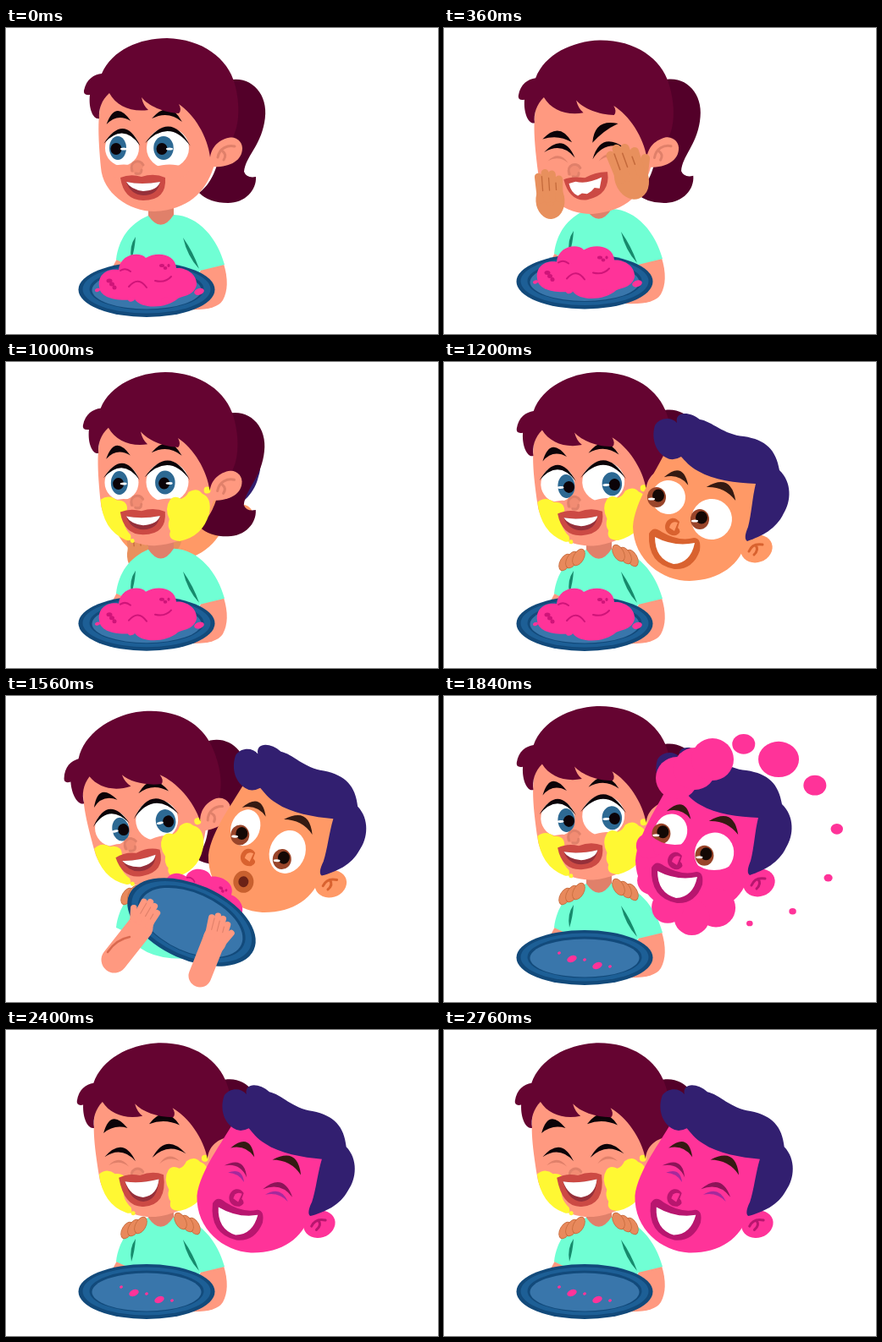
These frames come from a looping animation (510 px wide and 362 px high, 2.8 s). An HTML page with a canvas:

```html
<!DOCTYPE html>
<html lang="en">
<head>
<meta charset="utf-8">
<title>Colour fight</title>
<style>
html, body { margin: 0; width: 100%; height: 100%; overflow: hidden; background: #fff; }
canvas { display: block; width: 510px; height: 362px; }
</style>
</head>
<body>
<canvas id="stage" width="510" height="362"></canvas>
<script>
const ctx = document.getElementById('stage').getContext('2d');
const LOOP = 2800, STEP = 40;
const SKIN = '#ff9980', SKIN_DARK = '#e0806a', HAIR = '#650431', INK = '#0b0308';
const PINK = '#ff3399', PINK_DARK = '#cf1479', YELLOW = '#fff833';
const PALM = '#e8905d', PALM_DARK = '#c46a3c';

function fill(color, d) {
  ctx.fillStyle = color;
  ctx.fill(new Path2D(d));
}
function line(color, width, d) {
  ctx.strokeStyle = color;
  ctx.lineWidth = width;
  ctx.lineCap = ctx.lineJoin = 'round';
  ctx.stroke(new Path2D(d));
}
function oval(color, x, y, rx, ry = rx, rot = 0) {
  ctx.fillStyle = color;
  ctx.beginPath();
  ctx.ellipse(x, y, Math.max(rx, 0), Math.max(ry, 0), rot, 0, 7);
  ctx.fill();
}
// Moves the pivot (px, py) by (x, y), then turns and scales around it.
function at(draw, x = 0, y = 0, deg = 0, scale = 1, px = 0, py = 0) {
  ctx.save();
  ctx.translate(px + x, py + y);
  ctx.rotate(deg * Math.PI / 180);
  ctx.scale(scale, scale);
  ctx.translate(-px, -py);
  draw();
  ctx.restore();
}
// Tapered arch for brows, lids and closed eyes.
function arch(color, x, y, width, height, thick, deg = 0) {
  const w = width / 2, h = 2 * height;
  at(() => fill(color, `M${-w} 0Q0 ${-h} ${w} 0Q0 ${2 * thick - h} ${-w} 0Z`), x, y, deg);
}
function ramp(t, from, to) {
  const u = Math.min(1, Math.max(0, (t - from) / (to - from)));
  return u * u * (3 - 2 * u);
}
const pulse = (t, a, b, c, d) => ramp(t, a, b) * (1 - ramp(t, c, d));

function sceneAt(t) {
  return {
    t,
    rub: pulse(t, 160, 360, 840, 1020),
    gaze: ramp(t, 960, 1120),
    emerge: ramp(t, 920, 1160),
    raise: pulse(t, 1400, 1560, 1740, 1820),
    windup: pulse(t, 1400, 1640, 1640, 1740),
    smash: pulse(t, 1640, 1720, 1720, 1800),
    laugh: ramp(t, 2000, 2160),
    bob: 0.5 + 0.5 * Math.cos((t - 2400) / 360 * 2 * Math.PI),
    raised: t >= 1480 && t < 1800,
    scrunched: t >= 360 && t < 960,
    laughing: t >= 2080,
    pink: t >= 1720
  };
}

function hand(color, shade, x, y, deg, scale, side) {
  at(() => {
    oval(color, 0, 6, 17, 22);
    line(color, 9, `M${side * 12} 8L${side * 20} -8`);
    for (let i = 0; i < 4; i++) {
      const fx = -12 + 8 * i, tip = -20 - 7 * Math.sin(i + 0.4);
      line(color, 9, `M${fx * 0.9} 4L${fx} ${tip}`);
      if (i) line(shade, 1.3, `M${fx - 4} ${tip + 4}V-6`);
    }
  }, x, y, deg, scale);
}

function palms({ t, rub }) {
  const inward = 38 * (1 - rub) - 20 * Math.sin(Math.PI * rub);
  const y = 26 * (1 - rub) + 4 * Math.sin(t / 28) * pulse(t, 360, 400, 600, 640);
  hand(PALM, PALM_DARK, 125 + inward, 198 + y, -4, 1, 0);
  hand(PALM, PALM_DARK, 219 - inward, 171 + y, -20, 1.17, 1);
}

function shoulderHand(t, x, y, dir) {
  at(() => {
    for (let i = 0; i < 3; i++) {
      oval(PALM_DARK, dir * i * 8, -i * 3, 6.5, 11, dir * 0.5);
      oval('#e8895c', dir * i * 8, -i * 3, 5.7, 10.2, dir * 0.5);
    }
  }, x, y, 0, ramp(t, 1040, 1180));
}

function body({ raised }) {
  fill(SKIN_DARK, 'M168 203H198V226Q183 242 168 226Z');
  if (!raised) {
    fill(SKIN, 'M131 273L146 280L140 300H118Q124 285 131 273Z');
    fill(SKIN, 'M230 286L257 279Q265 305 256 322Q248 335 213 333Z');
  }
  fill('#70ffd4', 'M130 274C133 250 145 232 168 222Q183 244 198 221C228 222 250 250 258 280L229 287L222 310Q160 315 145 281Z');
  fill('#178a6c', 'M153 247Q145 258 148 274Q152 262 153 247ZM209 248Q214 270 228 285Q221 265 209 248Z');
}

function girlEye(x, y, rx, ry, gaze) {
  const ix = x - 5 + 15 * gaze, iy = y + 3 * gaze;
  oval('#fff', x, y, rx, ry);
  oval('#2d6993', ix, iy, rx * 0.35 + 3, 14);
  oval(INK, ix - 2 + 5 * gaze, iy + 1, 6.5, 7);
  oval('#fff', ix + 7 - 14 * gaze, iy + 1, 4, 1.5);
  oval(SKIN, x + 2, y + 28, rx * 0.9, 8.5);
  arch(INK, x, y - 4, rx * 2.15, ry * 0.9, 5.5, 4);
}

function girlMouth(open) {
  const top = 177 - 9 * open, inner = top + 5, bottom = 204;
  fill('#cc4a44', `M135 ${top}Q147 ${top - 5} 160 ${top - 1}Q175 ${top - 6} 188 ${top}Q190 ${bottom} 162 ${bottom}Q139 ${bottom} 135 ${top}Z`);
  fill('#96303a', `M142 ${inner}Q160 ${inner + 4} 182 ${inner}Q179 198 162 198Q147 197 142 ${inner}Z`);
  fill('#fff', `M142 ${inner}Q160 ${inner + 4} 182 ${inner}Q179 192 162 193Q147 191 142 ${inner}Z`);
}

function cheekPaint(scrunched) {
  fill(YELLOW, 'M112 162Q122 155 131 163Q145 163 143 176Q134 190 147 204Q149 213 141 210Q114 198 112 162Z');
  fill(YELLOW, 'M194 163Q199 157 207 162Q213 160 216 154Q226 148 232 156Q244 161 240 180Q232 207 205 212Q190 211 194 200Q190 194 193 186Q187 173 194 163Z');
  oval(YELLOW, 238, 152, 4);
  oval(YELLOW, 149, 211, 2.5);
  if (scrunched) {
    oval(YELLOW, 134, 155, 16, 14);
    oval(YELLOW, 203, 164, 11, 22);
  }
}

function girlFace({ t, gaze, laugh, scrunched, laughing }) {
  if (scrunched || laughing) {
    arch(INK, 138, 146, 37, 14, 6, 12);
    arch(INK, 196, 146, 40, 14, 6, scrunched ? -18 : -3);
    arch(SKIN_DARK, 136, 154, 24, 7, 3, 8);
    arch(SKIN_DARK, 196, 154, 24, 7, 3, -4);
  } else {
    girlEye(137, 142, 20, 21, gaze);
    girlEye(191, 142, 25, 24, gaze);
  }
  if (t >= 400) cheekPaint(scrunched);
  if (scrunched) {
    arch(INK, 136, 129, 35, 12, 8, 8);
    arch(INK, 193, 122, 38, 11, 9, -35);
  } else {
    arch(INK, 133 + 2 * gaze, 112, 29, 14, 8 + 2 * laugh, -8);
    arch(INK, 190 + 3 * gaze, 109, 36, 13, 7 + 2 * laugh, 6);
  }
  at(() => {
    fill('#f28c73', 'M147 170C144 157 160 153 162 164L158 173Z');
    line(SKIN_DARK, 3, 'M149 169C145 158 158 154 162 162M153 172Q160 174 160 168');
  }, 2 * laugh, laugh);
  if (scrunched) {
    fill('#cc4a44', 'M142 175Q152 171 167 174Q181 167 194 168Q197 195 169 200Q148 202 142 175Z');
    fill('#fff', 'M148 180L156 178Q169 182 187 174L184 187L178 186Q174 191 169 193L163 192L158 195Q150 191 148 180Z');
  } else girlMouth(laugh);
}

function girlHead(scene) {
  fill('#530029', 'M262 62C290 55 312 80 305 112C300 140 283 152 281 170Q284 178 295 176C296 192 282 207 262 207Q240 207 228 195C248 180 258 150 262 62Z');
  fill(SKIN, 'M118 72C106 95 109 130 112 165C114 195 145 217 175 217C215 215 235 195 245 165L262 90L200 60Z');
  fill(SKIN, 'M240 140C252 125 278 125 279 142C279 158 262 166 240 164Z');
  line(SKIN_DARK, 3, 'M250 153C252 142 262 138 270 140M256 146Q261 150 257 156');
  girlFace(scene);
  fill(HAIR, 'M113 54C125 26 158 12 190 12C232 13 262 36 270 66C277 92 275 115 268 129C255 130 243 138 241 153C238 128 222 102 204 90Q208 97 204 101C186 100 168 92 160 82Q162 92 168 97C148 100 130 92 122 77C113 85 109 96 110 107C104 109 97 97 99 79Q91 80 92 74C95 60 104 55 113 54Z');
}

function boyEye(x, y, r, shock) {
  const ix = x - 14 + 8 * shock, iy = y + 9 * shock;
  oval('#fff', x, y, r - 3 * shock, r + 2 * shock, 0.3);
  oval('#99452a', ix, iy, 11, 12);
  oval('#140805', ix + 2, iy - 2, 7, 7.5);
  oval('#fff', ix - 6, iy + 2, 4, 1.5);
}

function pinkLumps(t) {
  const size = ramp(t, 1680, 1820) * (1 - ramp(t, 1960, 2160)), drip = Math.max(0, t - 1840) * 0.04;
  for (let i = 0; i < 5; i++) {
    const a = 1 + i * 0.58;
    oval(PINK, 290 + 52 * Math.cos(a), 190 + 72 * Math.sin(a) + drip, (23 - 2 * i) * size);
  }
  for (let i = 0; i < 3; i++) oval(PINK, 272 + 21 * i, 97 - 11 * i + drip, 25 * size);
}

function boyHead({ t, raise, pink, emerge }) {
  const laughing = t >= 2120, shock = pink ? 0.3 : raise;
  const skin = pink ? PINK : '#ff9966', shade = pink ? '#b8166f' : '#d9622f';
  oval(skin, 369, 221, 19, 16, -0.35);
  fill(skin, 'M262 105C250 130 225 165 223 195C224 235 258 259 290 259C325 258 351 240 357 210L372 140L310 105Z');
  line(shade, 3, 'M360 224Q364 214 376 216M368 217Q372 222 366 228');
  fill('#321f70', 'M262 113C248 105 245 88 249 75C254 66 268 64 275 72C272 58 290 58 302 68C316 70 330 86 354 88C380 92 392 104 396 128C411 142 410 165 401 179C392 198 375 206 358 212Q353 209 359 195C363 180 364 160 368 144C345 143 318 140 300 129C290 124 284 116 280 112Q270 118 262 113Z');
  if (pink) pinkLumps(t);
  if (laughing) {
    arch('#8c1458', 267, 164, 30, 11, 5, 25);
    arch('#8c1458', 318, 187, 36, 13, 6, 12);
    arch('#a52a9c', 268, 171, 22, 7, 4, 28);
    arch('#a52a9c', 317, 193, 28, 8, 4, 14);
  } else {
    boyEye(265, 160, 20, shock);
    boyEye(316, 186, 24, shock);
    if (pink) fill(PINK, 'M240 164Q258 181 284 174L275 188L246 187ZM290 196Q315 216 344 196L334 217H300Z');
  }
  arch('#351a12', 274, 141, 30, 13, 8, 18);
  arch('#351a12', 327, 156, 38, 14, 9, 25);
  fill(shade, 'M263 201C256 190 270 178 278 189L276 196Q282 201 274 205Q267 206 263 201Z');
  fill(skin, 'M266 196Q268 187 276 190L272 200Z');
  if (shock > 0.5) {
    oval('#c8602f', 266, 224, 12, 13);
    oval('#6b2116', 266, 224, 6, 6.5);
  } else {
    fill(shade, 'M242 203Q247 193 257 201Q278 213 295 208Q304 208 302 223Q294 246 272 245Q240 239 242 203Z');
    fill('#fff', 'M249 207Q272 219 296 214Q291 238 271 239Q249 233 249 207Z');
  }
}

function mound() {
  fill(PINK, 'M110 307C108 292 120 285 133 287C135 268 158 265 165 273C178 265 200 268 201 285C212 284 226 292 225 305C222 318 208 318 203 321C190 333 160 334 152 322C130 325 111 320 110 307Z');
  line(PINK_DARK, 2, 'M145 307Q156 294 166 308M176 300Q188 303 195 295M135 288Q141 284 147 289');
  for (let i = 0; i < 3; i++) {
    oval(PINK_DARK, 122 + 3 * i, 300 + 4 * i, 3.5 - i * 0.5, 2.5);
    oval(PINK_DARK, 184 + 4 * i, 282 + 3 * (i % 2), 3 - i * 0.7, 2);
  }
  for (let i = 0; i < 4; i++) oval(PINK, 108 + 40 * i, 311 + 13 * Math.sin(i), 3 + i, 2 + i * 0.6, -0.3);
}

function crumbs() {
  for (let i = 0; i < 5; i++) oval(PINK, 136 + 15 * i, 305 + 4 * i + 3 * (i % 2), 2 + 4 * (i % 2), 1.7 + 2 * (i % 2), -0.4);
}

function girlHands() {
  line(SKIN, 31, 'M128 312L158 274');
  line(SKIN, 27, 'M229 331L246 288');
  hand(SKIN, SKIN_DARK, 162, 265, 30, 0.84, -1);
  hand(SKIN, SKIN_DARK, 248, 283, 14, 0.84, 1);
  line('#d9694f', 2.5, 'M120 303Q130 288 146 285');
}

function plate({ t, rub, raise, smash, raised }) {
  const x = 166 + 53 * raise + 81 * smash, y = 309.5 - 9.5 * rub - 42 * raise - 79 * smash;
  const rx = 80.5, ry = 32.5 + 12 * raise + 18 * smash, deg = 24 * raise + 8 * smash;
  const onPlate = draw => at(draw, x - 166, y - 310.5, deg, 1, 166, 310.5);
  if (raised && t < 1740) onPlate(() => at(mound, 0, -27, 0, 0.85, 166, 312));
  at(() => {
    oval('#124a7b', 0, 0, rx, ry);
    oval('#1d5f96', 0, -0.5, rx - 5, ry - 4);
    oval('#124a7b', 0, -0.5, rx - 13, ry - 8);
    oval('#3976ab', 0, 0.5, rx - 16, ry - 10);
  }, x, y, deg);
  if (raised) at(girlHands, x - 219, y - 267.5);
  else onPlate(t < 1600 ? mound : crumbs);
}

// Drops fan out from the hit, then fall and shrink.
function splash(t) {
  if (t < 1720 || t > 2120) return;
  const out = 1 - (1 - Math.min(1, (t - 1720) / 120)) ** 2;
  const late = Math.max(0, t - 1840), size = (0.5 + 0.5 * out) * (1 - ramp(t, 1840, 2120));
  for (let i = 0; i < 7; i++) {
    const a = (-67 + 22 * i) * Math.PI / 180, reach = (112 + 44 * Math.sin(i * Math.PI / 7) ** 2) * out;
    const r = (3 + 21 / (1 + (i - 1) ** 2)) * size;
    oval(PINK, 310 + reach * Math.cos(a) + late * 0.03, 160 + reach * Math.sin(a) + late * late * 0.0012, r, r * 0.88);
  }
}

function draw(t) {
  const scene = sceneAt(t);
  const { rub, gaze, emerge, raise, windup, smash, laugh, bob } = scene;
  const giggle = laugh * bob, hidden = 1 - emerge;
  const boy = () => at(() => boyHead(scene),
    -125 * hidden + 14 * raise + 10 * smash + 3 * ramp(t, 1720, 1840) - 2.5 * giggle,
    -30 * hidden - 3 * raise + laugh + 3.5 * giggle,
    -14 * hidden + 3 * raise + 3 * smash + 2 * laugh + giggle, 1, 290, 230);
  const palmsFront = rub > 0.55, boyFront = t >= 1080;

  ctx.clearRect(0, 0, 510, 362);
  if (t >= 940 && !boyFront) boy();
  if (rub > 0 && !palmsFront) palms(scene);
  at(() => body(scene), 0, -7 * rub);
  at(() => girlHead(scene), -4 * windup, 3 * rub + 0.5 * gaze + 8.5 * windup + 3.5 * giggle,
    -2 * rub - 3 * gaze - 10 * windup + 3 * smash - giggle, 1, 175, 195);
  if (palmsFront) palms(scene);
  shoulderHand(t, 143, 237, 1);
  shoulderHand(t, 222, 232, -1);
  if (boyFront) boy();
  splash(t);
  plate(scene);
}

const start = performance.now();
function tick() {
  const t = (performance.now() - start) % LOOP;
  draw(Math.floor(t / STEP) * STEP);
  requestAnimationFrame(tick);
}
tick();
</script>
</body>
</html>
```
